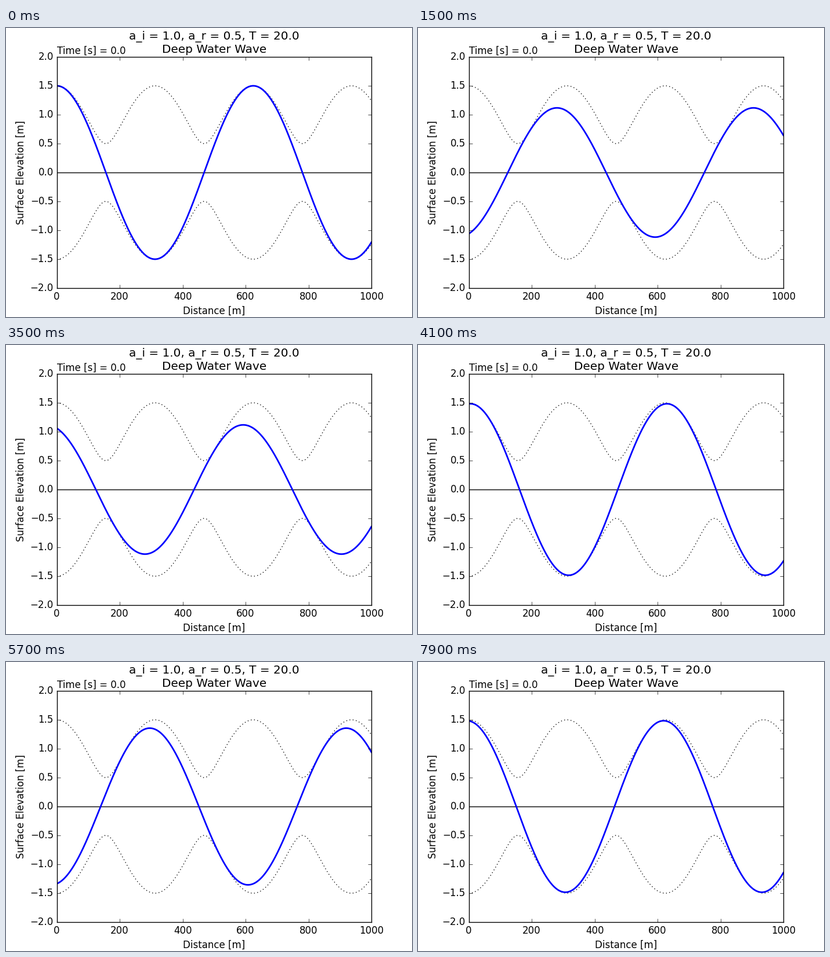
These frames come from a looping animation (700 by 500 pixels, 8000 ms). A matplotlib script:

```python
import matplotlib.pyplot as plt
import numpy as np
from matplotlib.animation import FuncAnimation

plt.style.use("classic")
plt.rcParams["font.family"] = "DejaVu Sans"

A_I, A_R, PERIOD = 1.0, 0.5, 20.0
FRAMES, INTERVAL = 80, 100
DT = 0.5  # wave seconds per frame

omega = 2 * np.pi / PERIOD
k = omega**2 / 9.81  # deep water dispersion
x = np.linspace(0, 1000, 1001)


def surface(t):
    return A_I * np.cos(k * x - omega * t) + A_R * np.cos(k * x + omega * t)


envelope = np.sqrt(A_I**2 + A_R**2 + 2 * A_I * A_R * np.cos(2 * k * x))

fig = plt.figure(figsize=(7, 5), dpi=100, facecolor="white")
ax = fig.add_axes([0.125, 0.1, 0.775, 0.8])
ax.set_xlim(0, 1000)
ax.set_ylim(-2, 2)
ax.set_xlabel("Distance [m]")
ax.set_ylabel("Surface Elevation [m]")
ax.set_title(f"a_i = {A_I}, a_r = {A_R}, T = {PERIOD}\nDeep Water Wave", y=1.0)
ax.text(0, 2.05, "Time [s] = 0.0")

ax.plot(x, envelope, "k:")
ax.plot(x, -envelope, "k:")
ax.plot([0, 1000], [0, 0], "k-")
wave, = ax.plot(x, surface(0), "b-", lw=2)


def update(i):
    wave.set_ydata(surface(i * DT))
    return wave,


anim = FuncAnimation(fig, update, frames=FRAMES, interval=INTERVAL,
                     repeat=True, repeat_delay=0)
plt.show()
```
